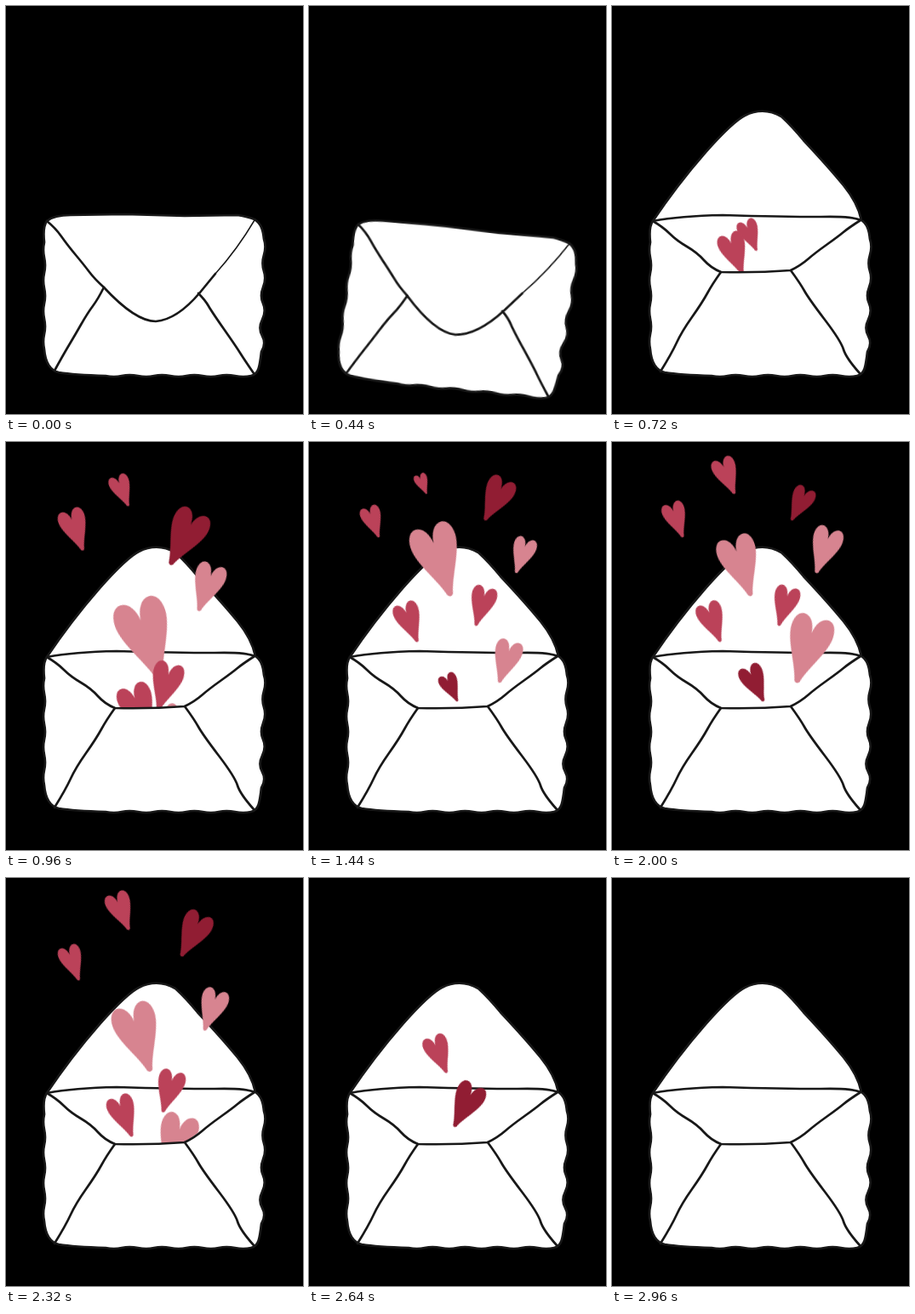
Recreate the animation shown at these times as an HTML page without scripts. Size 349 by 480 pixels, loop 3000 ms.

```html
<!DOCTYPE html>
<html lang="en">
<head>
<meta charset="utf-8">
<title>Love letter</title>
<style>
html, body { margin: 0; width: 100%; height: 100%; overflow: hidden; background: #000; }
svg { display: block; width: 100vw; height: 100vh; }

.paper { fill: #fff; stroke: #181818; stroke-width: 2.7; stroke-linejoin: round; stroke-linecap: round; }
.line { fill: none; }
.thin { stroke-width: 1.5; }

.closed { animation: closed 3s step-end infinite; }
.open { animation: open 3s step-end infinite; }
.shake { transform-origin: 172px 341px; animation: shake 3s ease-in-out infinite; }

/* x, y: resting tip; a: tilt; o, b: time of leaving and returning;
   m, n: size in flight out and back; lo, hi, d: pulse range and delay */
.out { animation: out 3s var(--o) infinite both; }
.back { animation: back 3s calc(var(--b) - 3s) infinite both; }
.beat { animation: beat 3s ease-in-out var(--d) infinite both; }
.heart { transform: translateX(calc(var(--a) * -1.33px)) rotate(calc(var(--a) * 1deg)); }
.rose { fill: #bb4259; }
.wine { fill: #911d33; }
.pink { fill: #d78490; }

@keyframes closed { 0% { opacity: 1; } 20%, 100% { opacity: 0; } }
@keyframes open { 0% { opacity: 0; } 20%, 100% { opacity: 1; } }
@keyframes shake {
  0% { transform: translate(0, 0) rotate(0deg) skewX(0deg) scaleX(1); }
  6.667% { transform: translate(6px, 2px) rotate(-6deg) skewX(2deg) scaleX(1.02); }
  14.667% { transform: translate(0, 15.5px) rotate(5.6deg) skewX(-2deg) scaleX(1.02); }
  18.667%, 100% { transform: translate(0, 23px) rotate(0deg) skewX(0deg) scaleX(1); }
}
@keyframes out {
  0% { transform: translate(175px, 420px); animation-timing-function: ease-out; }
  13.333%, 75% { transform: translate(var(--x), var(--y)); }
  75.01%, 100% { transform: translate(175px, 420px); }
}
@keyframes back {
  0% { transform: translate(0, 0); animation-timing-function: ease-in; }
  13.333%, 40% { transform: translate(calc(168px - var(--x)), calc(420px - var(--y))); }
  40.01%, 100% { transform: translate(0, 0); }
}
@keyframes beat {
  0%, 33.333% { transform: scale(calc(var(--m) / 100)); }
  36%, 49.333%, 62.667% { transform: scale(calc(var(--lo) / 100)); }
  42.667%, 56%, 69.333% { transform: scale(calc(var(--hi) / 100)); }
  76%, 100% { transform: scale(calc(var(--n) / 100)); }
}
</style>
</head>
<body>
<svg viewBox="0 0 349 480">
  <defs>
    <path id="heart" d="M-4 -2C-9 -24 -32 -56 -32 -79C-32 -93 -26 -101 -18 -101C-8 -101 -1 -89 0 -76C1 -89 8 -101 18 -101C26 -101 32 -93 32 -79C32 -56 9 -24 4 -2Q0 3 -4 -2Z"/>
    <path id="body" d="M48 253C54 248 64 246 76 246L140 245L210 247L272 246Q284 248 292 251C300 256 302 264 303 274q3 9 0 19t0 19t-1 19t0 19t-1 19t0 19t-1 19C298 424 297 433 288 435q-9 2 -19 0t-19 0t-19 0t-19 0t-19 0t-19 0t-19 0t-19 0t-19 0Q80 434 62 431C50 428 46 416 45 404q-2 -9 0 -18t0 -18t0 -18t0 -18t0 -18t0 -18t0 -18Q43 260 48 253Z"/>
    <clipPath id="pocket"><path d="M0 253H48L128 313Q170 314 210 311L292 252H349V480H0Z"/></clipPath>
  </defs>
  <rect width="349" height="480"/>

  <g class="closed">
    <g class="shake">
      <g class="paper">
        <use href="#body"/>
        <path class="line" d="M115 331Q108 345 102 353T88 375T74 399T57 429M226 338Q234 346 238 353T256 380T275 408T291 432"/>
        <path class="line" d="M48 253Q58 261 65 271T82 293T98 313T115 331Q152 371 176 371Q201 369 228 337L246 315"/>
        <path class="line thin" d="M246 315Q272 286 292 252"/>
      </g>
    </g>
  </g>

  <g class="open">
    <g class="paper">
      <path d="M48 253Q76 211 110 172Q142 136 156 129Q178 118 199 130Q212 142 225 158Q255 190 272 211Q289 232 293 252L293 300H48Z"/>
      <path stroke="none" d="M48 253Q100 246 180 247Q250 249 292 252L210 320H128Z"/>
      <path class="line" d="M48 253Q80 247 130 246Q200 248 245 248Q282 247 292 252"/>
    </g>

    <g class="out pink" style="--x:146px;--y:181px;--a:-18;--o:796ms;--b:2170ms;--d:80ms;--m:97;--n:80;--lo:70;--hi:94"><g class="back"><g class="beat"><use class="heart" href="#heart"/></g></g></g>
    <g class="out rose" style="--x:131px;--y:61px;--a:-22;--o:624ms;--b:2388ms;--d:0ms;--m:38;--n:46;--lo:22;--hi:55"><g class="back"><g class="beat"><use class="heart" href="#heart"/></g></g></g>
    <g class="out rose" style="--x:72px;--y:112px;--a:-20;--o:632ms;--b:2270ms;--d:0ms;--m:50;--n:42;--lo:37;--hi:45"><g class="back"><g class="beat"><use class="heart" href="#heart"/></g></g></g>
    <g class="out wine" style="--x:226px;--y:92px;--a:27;--o:696ms;--b:2344ms;--d:80ms;--m:69;--n:55;--lo:40;--hi:61"><g class="back"><g class="beat"><use class="heart" href="#heart"/></g></g></g>
    <g class="out pink" style="--x:254px;--y:154px;--a:19;--o:700ms;--b:2220ms;--d:0ms;--m:57;--n:50;--lo:41;--hi:62"><g class="back"><g class="beat"><use class="heart" href="#heart"/></g></g></g>
    <g class="out rose" style="--x:206px;--y:216px;--a:16;--o:820ms;--b:2130ms;--d:40ms;--m:57;--n:50;--lo:42;--hi:57"><g class="back"><g class="beat"><use class="heart" href="#heart"/></g></g></g>
    <g class="out rose" style="--x:114px;--y:235px;--a:-21;--o:856ms;--b:2100ms;--d:40ms;--m:64;--n:50;--lo:43;--hi:58"><g class="back"><g class="beat"><use class="heart" href="#heart"/></g></g></g>
    <g class="out pink" style="--x:235px;--y:283px;--a:17;--o:840ms;--b:2070ms;--d:320ms;--m:50;--n:55;--lo:48;--hi:80"><g class="back"><g class="beat"><use class="heart" href="#heart"/></g></g></g>
    <g class="out wine" style="--x:163px;--y:305px;--a:-25;--o:920ms;--b:2030ms;--d:0ms;--m:45;--n:45;--lo:33;--hi:51"><g class="back"><g class="beat"><use class="heart" href="#heart"/></g></g></g>

    <g class="paper">
      <use href="#body" clip-path="url(#pocket)"/>
      <path class="line" d="M48 253Q60 260 68 268T88 283T108 299T128 313Q170 314 210 311Q222 305 230 298T252 281T272 266T292 252"/>
      <path class="line" d="M128 313Q118 327 112 338T94 366T76 396T57 430M210 311Q221 326 226 335T250 369T272 404T291 432"/>
    </g>
  </g>
</svg>
</body>
</html>
```
